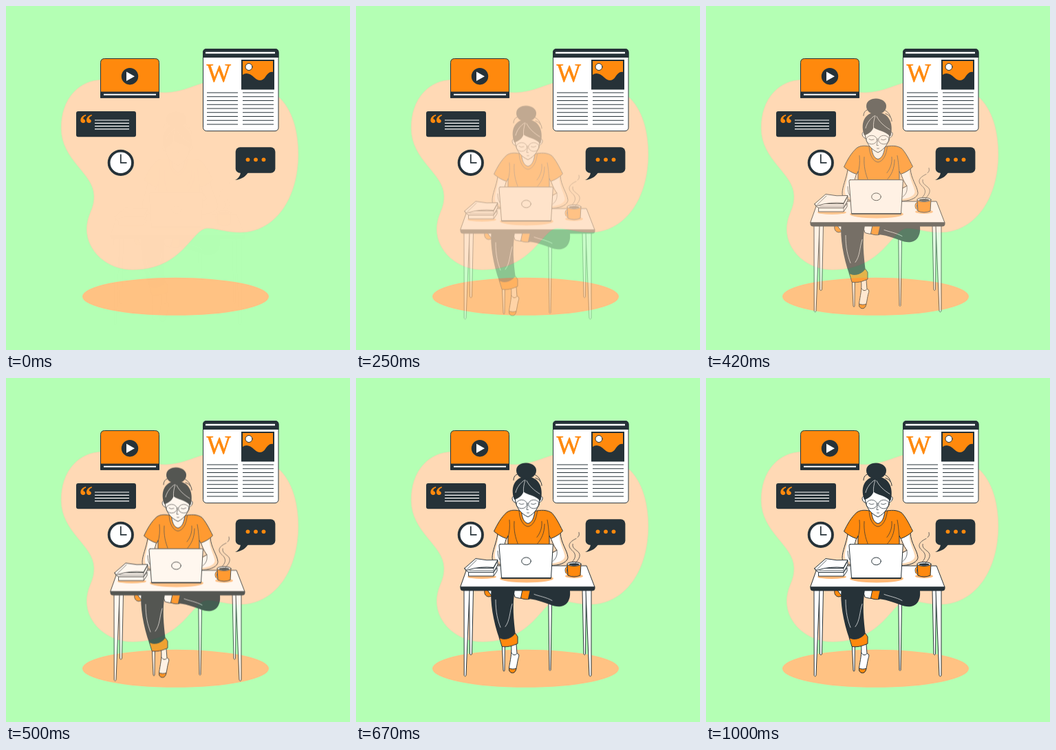
An HTML page for the animation above (1040 ms loop, 500x500 px).

```html
<!DOCTYPE html>
<html lang="en">
<head>
<meta charset="utf-8">
<title>Working at a desk</title>
<style>
  html, body { margin: 0; width: 100%; height: 100%; overflow: hidden; background: #b4ffb4; }
  svg { display: block; width: 100vw; height: 100vh; }
  .dark { fill: #263238; }
  .orange { fill: #ff890d; }
  .white { fill: #fff; }
  .shade { fill: #ffb977; }
  .skin { fill: #ffd9b5; }
  .ink { stroke: #263238; stroke-width: 1; stroke-linejoin: round; stroke-linecap: round; }
  .line { fill: none; }
  .thin { stroke-width: .7; }
  .thick { stroke-width: 1.8; }
  .light { fill: none; stroke: #fff; stroke-width: .7; stroke-linecap: round; }
  .serif { font-family: "Liberation Serif", "Times New Roman", serif; }

  /* Rise 30px while fading in, overshoot a little, then rest. */
  .worker { animation: rise 1040ms infinite; }
  @keyframes rise {
    0% {
      opacity: .005;
      transform: translateY(29.85px);
      animation-timing-function: cubic-bezier(.345, .09, .499, 1.367);
    }
    96%, 100% { opacity: 1; transform: none; }
  }
</style>
</head>
<body>
<svg viewBox="0 0 500 500">
  <path fill="#ffd9b5" stroke="#efd2ab" stroke-width=".6" d="M80.300 178C80 135 106 107.500 140 107.500C178 107.500 195 127 232 126C262 125 275 112 300 110C340 104 380 118 396 132C416 150 424.700 182 424.700 215C424.700 280 391 329 340 329C320 329 306 323 293 323C270 323 258 383.300 184 383.300C146 383.300 117.500 355 117.500 325C117.500 302 129 296 128 275C127 243 80.500 224 80.300 178Z"/>
  <ellipse cx="246.500" cy="422.300" rx="135.500" ry="27.500" fill="#ffc283"/>

  <!-- video player -->
  <path class="orange ink" d="M137.500 133V82.500Q137.500 76.500 143.500 76.500H216.500Q222.500 76.500 222.500 82.500V133Z"/>
  <path class="dark" d="M137 124.500H223V133.500H137Z"/>
  <path class="white" d="M142 127.800H218V129.800H142Z"/>
  <circle class="dark" cx="180" cy="102.200" r="12.200"/>
  <path class="white" d="M175 95.500L187 102.200L175 109Z"/>

  <!-- quote card -->
  <rect class="dark" x="102" y="153" width="87" height="37.300" rx="3"/>
  <text class="serif orange" x="106.500" y="185" font-size="39" font-weight="700">“</text>
  <path stroke="#fff" stroke-width="1.200" d="M129 166H179M129 170.300H179M129 174.600H179M129 178.900H179"/>

  <!-- clock -->
  <circle class="white" cx="166.800" cy="227.800" r="17.200" stroke="#263238" stroke-width="3.800"/>
  <path class="line" stroke="#263238" stroke-width="1.700" d="M166.800 215.500V227.800H175.500"/>

  <!-- article -->
  <rect class="white ink" x="286.500" y="62.500" width="109.500" height="119.200" rx="5"/>
  <path class="dark" d="M286 75V67.500Q286 62 291.500 62H391Q396.500 62 396.500 67.500V75Z"/>
  <path class="white" d="M290 66.700H391V69.300H290Z"/>
  <text class="serif orange" x="291.500" y="109.500" font-size="37.500" stroke="#ff890d" stroke-width=".6">W</text>
  <path class="dark" d="M342 78H390V121.500H342Z"/>
  <path class="orange" d="M344 80H388V96C383 95 380 99 377 103C373 109 367 110 361 104C355 98 349 96 344 100Z"/>
  <circle class="white ink" cx="353" cy="88.500" r="5"/>
  <g id="lines" stroke="#263238" stroke-width="1"></g>

  <!-- chat bubble -->
  <rect class="dark" x="333.700" y="205.300" width="57.700" height="37.400" rx="6.500"/>
  <path class="dark" d="M341 241C341 247 337 251 333 253C343 252 349 247 352.500 241Z"/>
  <g class="orange">
    <circle cx="351.500" cy="223.300" r="2.900"/>
    <circle cx="363" cy="223.300" r="2.900"/>
    <circle cx="374.500" cy="223.300" r="2.900"/>
  </g>

  <g class="worker"><g transform="translate(0 .5)">
    <!-- chair and rear table legs -->
    <g class="white ink">
      <path d="M212 380L214 425Q215 426.500 216 425L216.500 380Z"/>
      <path d="M279.800 325L281 424Q282 426 283 424L284.500 325Z"/>
      <path d="M164.500 308L165.500 401Q167 403 168.500 401L170.500 308Z"/>
      <path d="M329 308L331 401Q332.300 403 333.500 401L334.500 308Z"/>
    </g>

    <!-- crossed leg -->
    <path class="orange ink" d="M187 308C186 313 188 317 193 317.500L200 316V308Z"/>
    <path class="white ink" d="M191 308L197 316L212 313V308ZM228 308L231 318C235 319.500 239 320 243 320V308Z"/>
    <path class="orange ink" d="M242 307L239.500 319.500C244 321.500 248 321.500 252 321L256 307Z"/>
    <path class="dark" d="M253 307L250 320.500C266 322 278 328 288 331C298 333.500 306 330 309 323C312 317 311 312 311 307Z"/>
    <path class="light" d="M259 314C267 317 276 318 285 323"/>

    <!-- standing leg -->
    <path class="white ink" d="M225.500 388C227 400 224 410 222.500 421C222 427 226 429 230 427.500C234 424 234 412 236.500 405C237.500 402 236 400 234 400L233 387Z"/>
    <path class="orange ink" d="M222.600 421.500C226 423 230 423 233 421.500C232 427 229 429 226 428C223 427 222 424.500 222.600 421.500Z"/>
    <path class="line ink" d="M226 399C228 403 232 403 234 400"/>
    <path class="dark" d="M196.500 307C195 325 199 352 208.500 379C217 382 226 380 232 374C229 350 227 330 231 307Z"/>
    <path class="light" d="M203 322C203 340 206 352 210 362M227 328C223 340 224 352 217 361"/>
    <path class="orange ink" d="M208.500 377C216 381.500 226 378 231.500 370.500L235 375.500V385.500C228 389 220 391 212.500 390Z"/>

    <!-- table -->
    <g class="white ink">
      <path d="M157 308L157.200 432Q158.500 434.500 160 432L165 308Z"/>
      <path d="M334 308L339 432Q340.500 434.500 342 432V308Z"/>
      <path d="M163 272.500H335L347 303.500H152Z"/>
    </g>
    <path class="dark" d="M151.500 303H347.500V305.500Q347 309 343 309H156Q152 309 151.500 305.500Z"/>
    <g class="shade">
      <ellipse cx="248" cy="291" rx="39" ry="6"/>
      <ellipse cx="183" cy="288.500" rx="21" ry="3"/>
      <ellipse cx="317" cy="287.500" rx="13" ry="3"/>
    </g>

    <!-- arms, with a tinted strip along the outer edge -->
    <path class="skin ink" d="M206 226C204 240 198 251 198 261C198 268 204 271 214 271L213 251L219 231Z"/>
    <path class="white" d="M207 228C206 241 201 252 202 260Q203 266 212 268L212.500 251L218 232Z"/>
    <path class="skin ink" d="M283 231C286 241 289 246 292 250L284 254V272C299 272 308 266 308 260C307 250 298 240 297 225Z"/>
    <path class="white" d="M284 232C287 241 290 246 293 250L285 255V269C297 268 304 263 303.500 258C302 249 296 241 295 227Z"/>
    <path class="line ink thin" d="M292 250C293 257 291 262 286 266M206 251C206 257 207 262 210 265"/>

    <!-- shirt, neck -->
    <path class="orange ink" d="M240 193C233 191.500 225 190.500 219 195C211 202 205 213 200.500 222.500C206 227 212 231 219 233L221 229V250H281V229L283 233C290 230.500 296 227 300.500 222C295 211 291 203 285 196C278 190.500 268 191.500 260 193Z"/>
    <path class="white ink" d="M240.500 193C241 202 244 210 250 211C256 210 259 202 260 193L257 188H242Z"/>
    <path class="line ink thin" d="M237 193C238 206 243 214.500 250 215.500C257 214.500 262 206 263.500 193"/>
    <path class="line ink thin" d="M223 206C224 216 223 224 221 231M230 208C229 222 232 232 235 240M278 206C280 216 280 223 281 230M274 212C274 226 269 234 264 240M270 208C271 218 267 226 263 231"/>

    <!-- head -->
    <path class="white ink" d="M231 172C226 169 225 179 232 181ZM266 172C273 169 273 178 266 181Z"/>
    <path class="dark" d="M229.500 175C224 158 231 143 248 143C265 143 273 158 268.500 177L264 181H234Z"/>
    <path class="dark" d="M233 134C233 127 239 123 247 123C256 123 262 128 262 134C262 141 256 146 247 146C239 146 233 141 233 134Z"/>
    <path class="white" d="M231.500 176C237 174 242 170 243.500 165C250 170 260 170 266.500 177C266.500 188 259 197 250 201.500C240 197 232 188 231.500 176Z"/>
    <path class="line ink" d="M266.500 177C266.500 188 259 197 250 201.500C240 197 232 188 231.500 176"/>
    <path class="line ink" d="M236 139C231 140 229 144 229 148M258 139C264 142 267 145 268 150M261 145C267 147 270 151 270 156"/>
    <path class="light" d="M246 148C244 154 243 160 243.500 165M248 149C252 157 259 163 267 168M245 148C239 152 234 158 232 166"/>
    <g class="line ink thin">
      <ellipse cx="240.800" cy="183" rx="7.800" ry="6.300"/>
      <ellipse cx="258.500" cy="183" rx="7.800" ry="6.300"/>
      <path d="M248.500 182Q249.500 181 250.500 182M237 182Q240 184.500 244 182.500M254.500 182.500Q258 184.500 261.500 182M249.500 184L248 191H250.500M248.500 195.500Q250 196.200 251.500 195.500"/>
    </g>

    <!-- laptop -->
    <path class="white ink" d="M209.500 241.200H284.500Q286.500 241.200 286.300 243L283.500 290H211.500L208 243Q207.800 241.200 209.500 241.200Z"/>
    <path class="ink thick" d="M212 290.500H283"/>
    <ellipse class="white ink" cx="247.500" cy="265.800" rx="6.800" ry="5.400"/>

    <!-- books -->
    <path class="white ink" d="M164 282H200L205 275V280L200 287.500H164Z"/>
    <path class="white ink" d="M163 276H200L206 265V271L200 282H164Q159 280 158 277Z"/>
    <path class="white ink" d="M158 276L174 262Q190 265.500 206 264L200 275Q180 273 163 278.500Q159 279.500 158 276Z"/>
    <path class="line ink thin" d="M162 277L175 264.500M200 276V287M165 279.500H199"/>

    <!-- mug and steam -->
    <path class="line ink" stroke-linecap="butt" d="M308 274C302.500 272.500 302.500 286 309 285M308 276.500C305.500 275.500 305.500 283 308.500 282.500"/>
    <path class="line thick" stroke="#ff890d" d="M308 275.200C304 274 304 284.500 309 283.800"/>
    <path class="orange ink" d="M307 270L308 286.500Q317 290.500 326 286.500L327 270Z"/>
    <ellipse class="white ink" cx="317" cy="270" rx="10" ry="3"/>
    <ellipse class="dark" cx="317" cy="270.500" rx="7.500" ry="1.700"/>
    <path class="line ink thin" d="M324 224C325 228 324 230 322 231M320 233C309 238 307 244 314 250C321 256 319 262 314 267M315 241C313 250 327 250 325 259C324 264 320 266 319 269"/>
  </g></g>
</svg>
<script>
  // Two columns of nine text rules.
  let rules = "";
  for (let i = 0; i < 9; i++) {
    const y = 126 + i * 5.75;
    rules += `M292 ${y}h45M344 ${y}h45`;
  }
  document.getElementById("lines").innerHTML = `<path d="${rules}"/>`;
</script>
</body>
</html>
```
